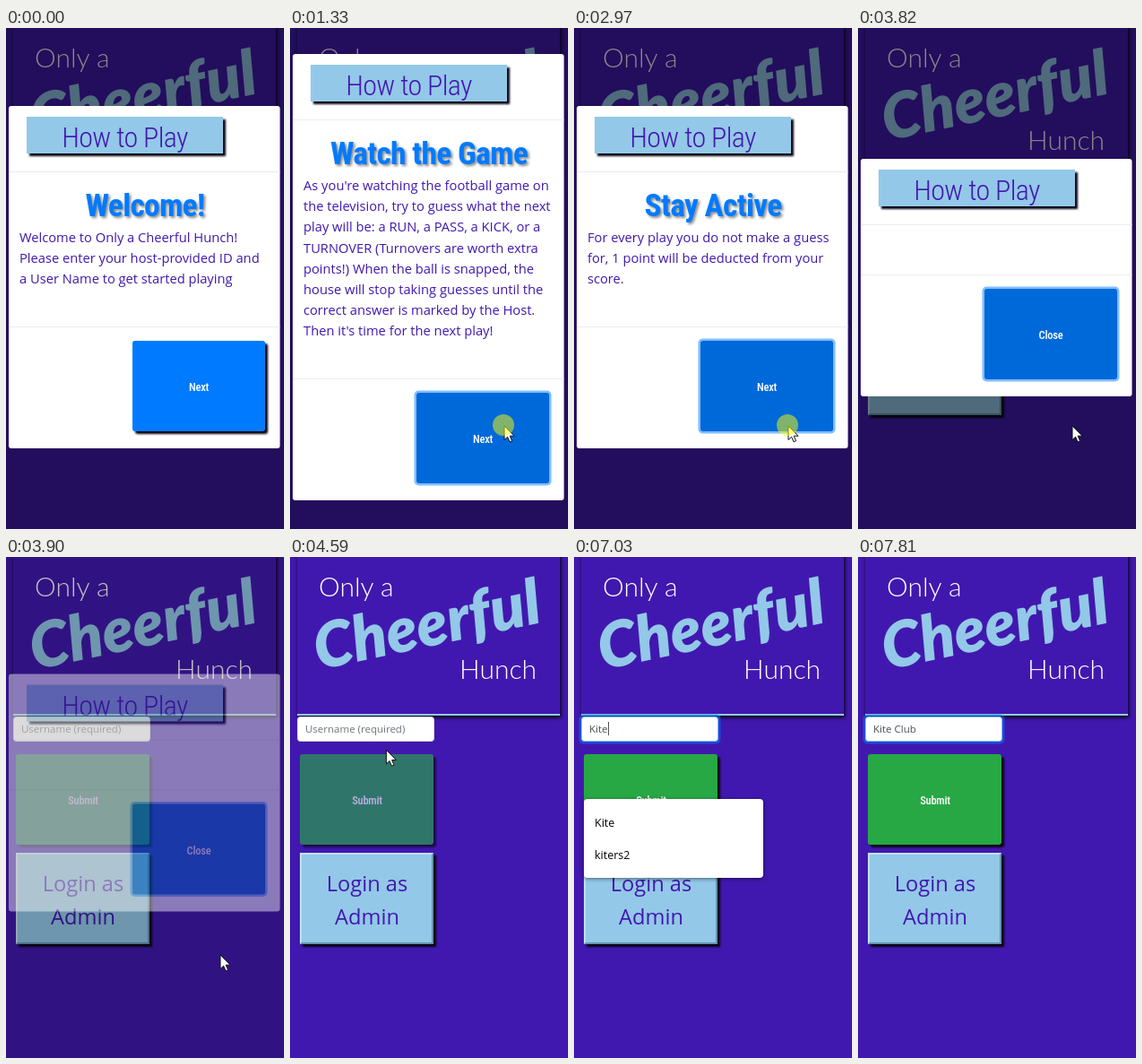
These frames come from a looping animation (310 by 559 pixels, 8 s). An HTML page:

```html
<!DOCTYPE html>
<html lang="en">
<head>
<meta charset="utf-8">
<title>How to Play</title>
<style>
  html, body { margin: 0; width: 100%; height: 100%; overflow: hidden; background: #4118af; }
  svg { display: block; width: 310px; height: 559px; }
  text { font-family: "Open Sans", "Noto Sans", sans-serif; white-space: pre; }
  .mid { text-anchor: middle; }
  .narrow { font-family: "Roboto Condensed", Roboto, sans-serif; font-stretch: 75%; letter-spacing: -.02em; }
  .copy { font-size: 14.7px; fill: #4118af; }
  .btn { font-size: 12.5px; font-weight: 500; fill: #fff; }
  .field { font-size: 11.5px; }
  .item { font-size: 12.5px; fill: #000; }
  .hand { font-family: Lato, sans-serif; font-weight: 300; font-size: 30px; fill: #fff; }
  .hard { filter: drop-shadow(3px 3px 1px #080312); }
</style>
</head>
<body>
<svg viewBox="0 0 310 559">
  <rect width="310" height="559" fill="#4118af"/>
  <g style="filter:drop-shadow(1px 2px 2px #000)">
    <rect x="8" y="-8" width="293" height="185" fill="#4118af"/>
    <rect x="8" y="175" width="293" height="2" fill="#93c8e8"/>
  </g>
  <text class="hand" x="32" y="44">Only a</text>
  <text transform="translate(32 126) rotate(-12)" font-size="70" font-weight="900" font-style="italic" fill="#93c8e8" style="font-family:Lato,sans-serif">Cheerful</text>
  <text class="hand" x="189" y="136">Hunch</text>

  <rect id="ring" x="5.5" y="175.5" width="158" height="33" rx="5" fill="#007bff" fill-opacity=".5"/>
  <rect id="box" x="8.5" y="178.5" width="152" height="27" rx="3" fill="#fff"/>
  <text id="typed" class="field" x="17" y="196"></text>
  <rect id="caret" y="184" width="1" height="15" fill="#495057"/>

  <g id="submit">
    <rect class="hard" x="11" y="220" width="149" height="101" rx="3" fill="#28a745"/>
    <text class="btn narrow mid" x="86" y="276">Submit</text>
  </g>
  <g class="hard">
    <rect x="11" y="330" width="149" height="102" fill="#93c8e8"/>
    <path d="M11 432V330H160L158 332H13V430Z" fill="#c3dff0"/>
    <path d="M11 432H160V330L158 332V430H13Z" fill="#6594b1"/>
  </g>
  <g class="mid" font-size="23.6" fill="#4118af">
    <text x="86" y="373">Login as</text>
    <text x="86" y="410">Admin</text>
  </g>

  <g id="menu">
    <rect id="sheet" x="11" y="270" rx="4" fill="#fff" style="filter:drop-shadow(0 1px 2px #0008)"/>
    <g id="items"></g>
  </g>

  <rect id="shade" width="310" height="559"/>
  <g id="modal">
    <rect id="card" x="3" width="302.5" rx="3" fill="#fff"/>
    <rect class="hard" x="23" y="12" width="219" height="41" fill="#93c8e8"/>
    <text class="narrow mid" x="132.5" y="46" font-size="32" font-weight="300" fill="#4118af">How to Play</text>
    <rect x="3" y="73" width="302.5" height="1" fill="#e9ecef"/>
    <text id="title" class="narrow mid" x="155" y="123" font-size="35.5" font-weight="700" fill="#007bff" style="filter:drop-shadow(2px 2px 1.5px #0007)"></text>
    <g id="copy"></g>
    <g id="foot">
      <rect x="3" y="0" width="302.5" height="1" fill="#e9ecef"/>
      <rect id="halo" x="138.5" y="13.5" width="153" height="106" rx="5" fill="#80bdff"/>
      <rect id="next" x="141" y="16" width="148" height="101" rx="3"/>
      <text id="label" class="btn narrow mid" x="215" y="72"></text>
    </g>
  </g>

  <path id="arrow" d="M0 0V15.5L3.6 12.2L6 17.8L8.6 16.7L6.2 11.2H11Z" fill="#fff" stroke="#111" stroke-width="1"/>
  <circle id="spot" r="12" fill="#ff0" fill-opacity=".5"/>
</svg>
<script>
const LOOP = 8000, TICK = 78, LINE = 23.2;
const $ = id => document.getElementById(id);
const set = (id, attrs) => { for (const k in attrs) $(id).setAttribute(k, attrs[k]); };
const show = (id, on) => set(id, { display: on ? 'inline' : 'none' });
const within = (t, a, b) => t >= a && t < b;
// last entry whose time has been reached
const at = (list, t) => list.filter(e => e[0] <= t).pop();

const pages = [
  [0, 'Welcome!', ['Welcome to Only a Cheerful Hunch!', 'Please enter your host-provided ID and', 'a User Name to get started playing']],
  [940, 'Watch the Game', ["As you're watching the football game on", 'the television, try to guess what the next', 'play will be: a RUN, a PASS, a KICK, or a',
    'TURNOVER (Turnovers are worth extra', 'points!) When the ball is snapped, the', 'house will stop taking guesses until the',
    'correct answer is marked by the Host.', "Then it's time for the next play!"]],
  [1410, 'Score Points', ['For every play you guess correctly, you', 'will earn points. The harder the play is', 'to guess, the more points it is worth.',
    'Keep an eye on your score during the', 'game to see how you compare with the', 'other players!']],
  [1960, 'Stay Active', ['For every play you do not make a guess', 'for, 1 point will be deducted from your', 'score.']],
  [3040, 'Have Fun!', ['The player with the most points at the', 'end of the game is the winner. Good', 'luck!']],
  [3820, '', []]
];
const clicks = [[790, 1010], [1330, 1490], [1880, 2110], [2970, 3120], [3670, 3820], [5300, 5450]];
const typing = [[0, ''], [6700, 'K'], [6780, 'Ki'], [6860, 'Kit'], [7030, 'Kite'], [7120, 'Kite '],
  [7350, 'Kite C'], [7430, 'Kite Cl'], [7660, 'Kite Clu'], [7810, 'Kite Club']];
const names = ['Kite', 'kiters2', 'Kitchen table league members', 'Kappa'];
const menus = [[0, 0], [6780, 4], [6860, 3], [7030, 2], [7120, 0]];
// start, number of steps, from, to
const moves = [
  [240, 3, [260, 532], [239, 444]],
  [4360, 5, [239, 444], [83, 173]],
  [4820, 3, [83, 173], [83, 196]],
  [5770, 2, [83, 196], [211, 129]]
];

const lines = (list, cls, x, y, step) =>
  list.map((s, i) => `<text class="${cls}" x="${x}" y="${y + i * step}">${s}</text>`).join('');

function pointer(t) {
  const [start, n, a, b] = at(moves, t) || moves[0];
  const k = Math.min(1, Math.max(0, Math.floor((t - start) / TICK + .1)) / (n - 1));
  const e = k * k * (3 - 2 * k);
  return a.map((v, i) => v + (b[i] - v) * e);
}

let shownPage, shownMenu;

function drawModal(t) {
  const open = t < 3980;
  show('modal', open);
  show('shade', open);
  if (!open) return;
  const page = at(pages, t), [, title, text] = page;
  const fading = t >= 3900;
  const height = text.length ? 312.4 + LINE * text.length : 265;
  const top = Math.round(278 - height / 2) - (fading ? 15.5 : 0);
  if (page !== shownPage) {
    $('title').textContent = title;
    $('copy').innerHTML = lines(text, 'copy', 15, 152, LINE);
    $('label').textContent = t < 3040 ? 'Next' : 'Close';
    shownPage = page;
  }
  set('modal', { transform: `translate(0 ${top})`, opacity: fading ? .44 : 1 });
  set('shade', { opacity: fading ? .25 : .47 });
  set('card', { height });
  set('foot', { transform: `translate(0 ${Math.round(height - 136)})` });
  const used = t >= 790;
  show('halo', used);
  set('next', { fill: used ? '#0069d9' : '#007bff', class: used ? '' : 'hard' });
}

function drawForm(t) {
  const text = at(typing, t)[1], focus = t >= 5380;
  show('ring', focus);
  set('box', { stroke: focus ? '#80bdff' : '#ced4da' });
  $('typed').textContent = text || 'Username (required)';
  set('typed', { fill: text ? '#495057' : '#6c757d' });
  set('caret', { x: text ? 17.5 + $('typed').getComputedTextLength() : 17 });
  show('caret', within(t, 5380, 5850) || within(t, 6380, 7810));
  set('submit', { opacity: text ? 1 : .65 });

  const count = at(menus, t)[1];
  show('menu', count > 0);
  if (count !== shownMenu) {
    $('items').innerHTML = lines(names.slice(0, count), 'item', 23, 301, 36);
    set('sheet', { width: count > 2 ? 249 : 200, height: 16 + 36 * count });
    shownMenu = count;
  }
}

function draw(t) {
  drawForm(t);
  drawModal(t);
  const [x, y] = pointer(t);
  show('arrow', within(t, 240, 5920));
  set('arrow', { transform: `translate(${x} ${y})` });
  show('spot', clicks.some(([a, b]) => within(t, a, b)));
  set('spot', { cx: x - 1, cy: y - 1 });
}

const begin = performance.now();
function frame() {
  draw((performance.now() - begin) % LOOP);
  requestAnimationFrame(frame);
}
draw(0);
requestAnimationFrame(frame);
</script>
</body>
</html>
```
